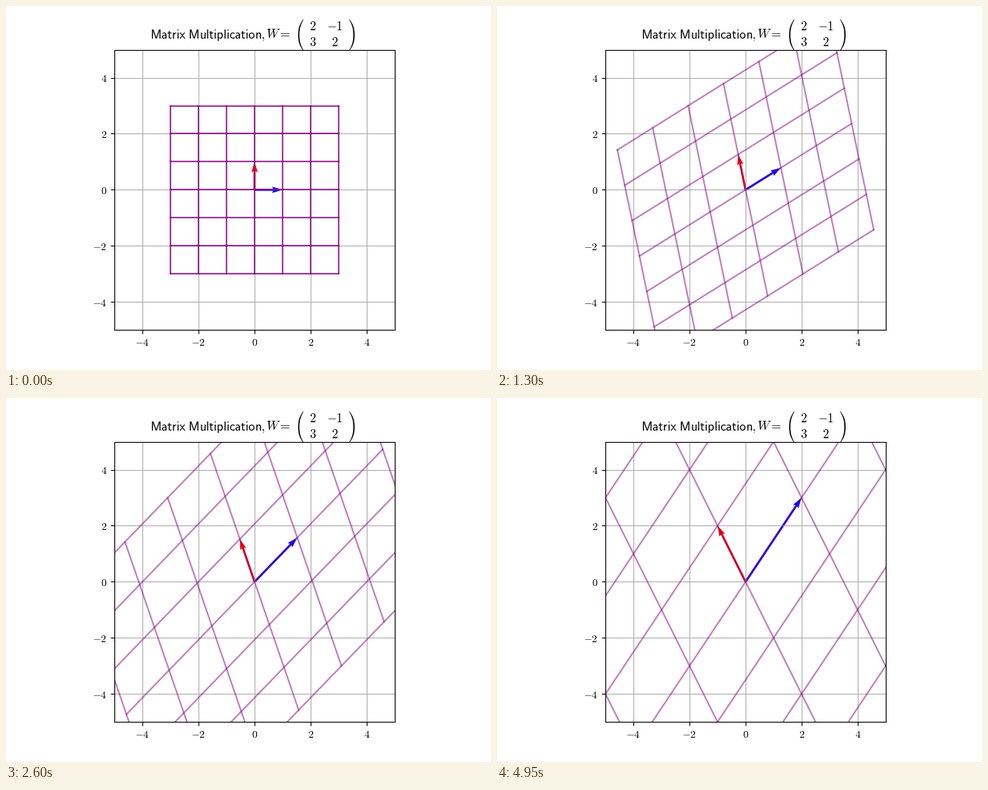
Animation of 640x480 px, one loop 5000 ms. Source, as a matplotlib script:

```python
import matplotlib.pyplot as plt
import numpy as np
from matplotlib.animation import FuncAnimation
from matplotlib.patches import PathPatch
from matplotlib.path import Path
from matplotlib.transforms import Affine2D

WIDTH, HEIGHT, DPI = 640, 480, 100
FRAMES = 100
W = np.array([[2, -1], [3, 2]])

plt.rcParams["mathtext.fontset"] = "cm"
fig, ax = plt.subplots(figsize=(WIDTH / DPI, HEIGHT / DPI), dpi=DPI)
ax.set_aspect("equal")
ax.set_xlim(-5, 5)
ax.set_ylim(-5, 5)
ticks = np.arange(-4, 5, 2)
labels = [f"${t}$" for t in ticks]
ax.set_xticks(ticks, labels)
ax.set_yticks(ticks, labels)
ax.grid(True)

# Pixel coordinates with the origin at the top left.
pixels = Affine2D().scale(1 / WIDTH, -1 / HEIGHT).translate(0, 1) + fig.transFigure


def label(x, y, text, ha="center"):
    fig.text(x, y, text, transform=pixels, fontsize=12, ha=ha, va="baseline")


def paren(tip, bulge, top=17.5, bottom=59):
    """Tall parenthesis: a thin crescent between two curves."""
    mid = (top + bottom) / 2
    side = np.sign(tip - bulge)
    inner = bulge + side * 1.7
    reach = 0.24 * (bottom - top)
    verts = [
        (tip, top),
        (bulge + side * 2, top + reach * 0.7), (bulge, mid - reach), (bulge, mid),
        (bulge, mid + reach), (bulge + side * 2, bottom - reach * 0.7), (tip, bottom),
        (tip + side * 0.7, bottom),
        (inner + side * 2, bottom - reach * 0.7), (inner, mid + reach), (inner, mid),
        (inner, mid - reach), (inner + side * 2, top + reach * 0.7),
        (tip + side * 0.7, top),
        (tip, top),
    ]
    curve = [Path.CURVE4] * 6
    codes = [Path.MOVETO, *curve, Path.LINETO, *curve, Path.CLOSEPOLY]
    fig.add_artist(PathPatch(Path(verts, codes), transform=pixels, fc="black", lw=0))


label(190, 42, r"$\mathsf{Matrix\ Multiplication,}$", "left")
label(343, 42, r"$W=$", "left")
paren(392, 385.5)
paren(453.3, 460)
for row, base in zip(W, (32, 53)):
    for value, x in zip(row, (405.2, 433.5)):
        label(x, base, f"${value}$")

# Unit grid: seven lines in each direction.
span = np.array([-3, 3])
segments = []
for k in range(-3, 4):
    fixed = np.full(2, k)
    segments += [np.array([fixed, span]), np.array([span, fixed])]


def draw_grid():
    return [ax.plot(*s, color="purple", alpha=0.5, lw=1.5)[0] for s in segments]


lines = draw_grid()
overlay = draw_grid()
arrows = ax.quiver([0, 0], [0, 0], [1, 0], [0, 1], color=["blue", "red"],
                   angles="xy", scale_units="xy", scale=1)


def update(i):
    s = i / (FRAMES - 1)
    matrix = (1 - s) * np.eye(2) + s * W
    for line, segment in zip(lines, segments):
        line.set_data(*(matrix @ segment))
    for line in overlay:
        line.set_visible(i == 0)
    arrows.set_UVC(matrix[0], matrix[1])
    return [*lines, *overlay, arrows]


anim = FuncAnimation(fig, update, frames=FRAMES, interval=50, repeat=True)
plt.show()
```
